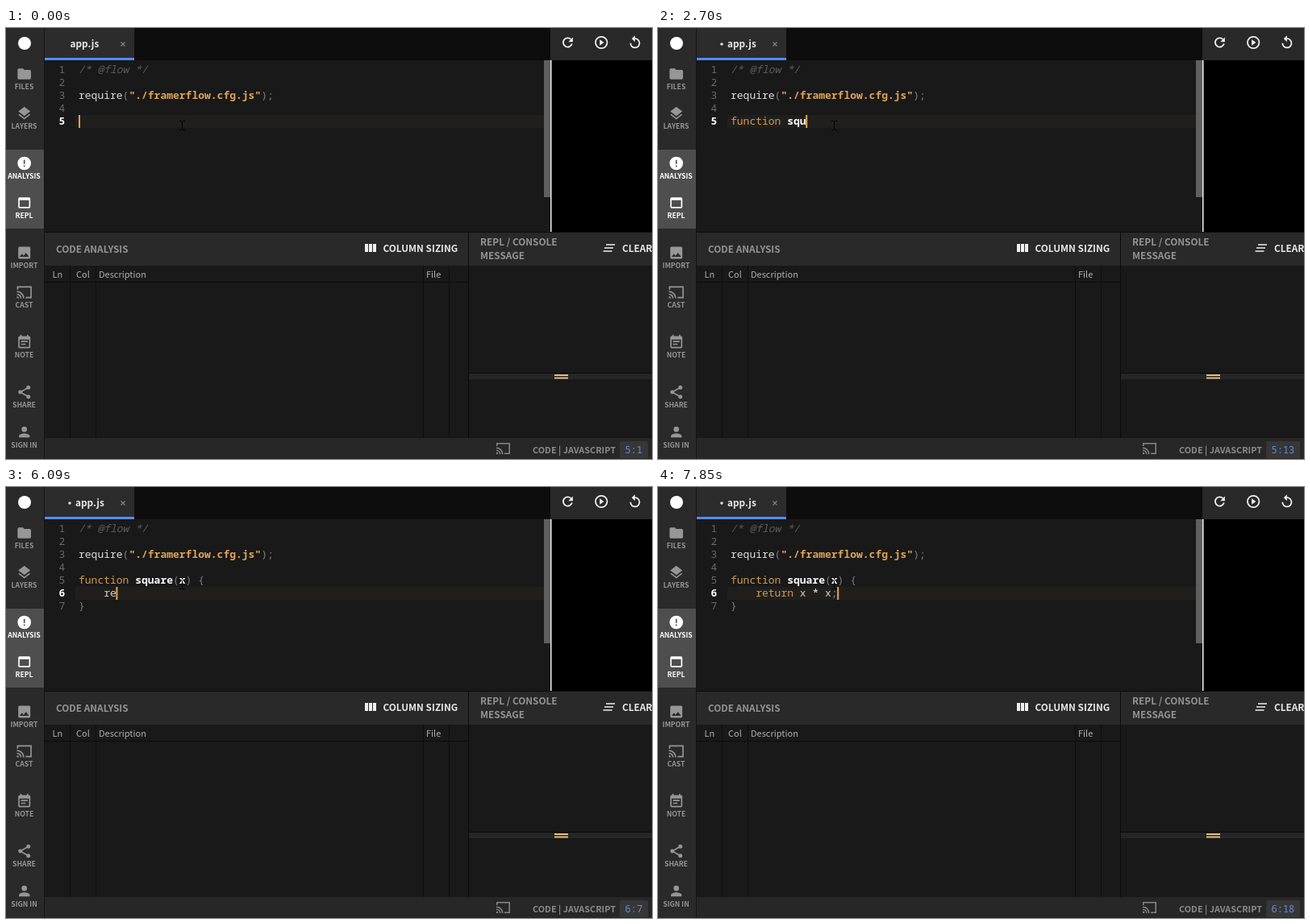
Recreate the animation shown at these times as an HTML page. Size 801x535 px, loop 8000 ms.

```html
<!DOCTYPE html>
<html lang="en">
<head>
<meta charset="utf-8">
<title>Code editor</title>
<style>
html, body { margin: 0; width: 100%; height: 100%; overflow: hidden; background: #191919; }
#stage { position: relative; width: 801px; height: 535px; overflow: hidden; }
svg { position: absolute; left: 0; top: 0; }
text { white-space: pre; }
.ui { font: 700 11.8px "Noto Sans CJK JP", "Noto Sans CJK SC", "Noto Sans CJK", "Noto Sans", sans-serif; fill: #e8e8e8; }
.ui .dim { fill: #949494; }
.ui .small { font-size: 11px; font-weight: 400; fill: #b0b0b0; }
.ui .lang { font-size: 10.9px; fill: #8b8b8b; }
.ui .side { font-size: 8.7px; text-anchor: middle; }
.mono { font: 400 13px "Noto Sans Mono", "DejaVu Sans Mono", monospace; fill: #cfcfcf; }
.num { fill: #686868; }
.num.on { fill: #fff; font-weight: 700; }
.note { fill: #5c5c5c; font-style: italic; }
.call { fill: #dedede; font-weight: 500; }
.str { fill: #dfa356; font-weight: 700; }
.kw { fill: #d59a4d; }
.def { fill: #fff; font-weight: 700; }
.op { fill: #f0f0f0; }
.punct { fill: #7d7d7d; }
#pos { font-size: 12px; fill: #6090dc; }
#menu { position: absolute; width: 464px; background: #242424; color: #eee;
  font: 500 12px/28px "Noto Sans Mono", "DejaVu Sans Mono", monospace;
  box-shadow: 0 12px 40px rgba(0, 0, 0, .6); }
#menu div { height: 28px; padding: 0 7.5px 0 6.5px; white-space: pre; }
#menu div:first-child { background: #2962ff; }
#menu b { font-weight: 500; color: #d8b878; }
#menu i { float: right; font-style: normal; color: #8badf0; }
#menu div:first-child i { color: #fff; }
</style>
</head>
<body>
<div id="stage">
<svg width="801" height="535" viewBox="0 0 801 535">
  <defs>
    <g id="folder"><path d="M-2-8H-8Q-10-8-10-6V6Q-10 8-8 8H8Q10 8 10 6V-4Q10-6 8-6H0z"/></g>
    <g id="layers"><path d="M0-10L9-3 0 4-9-3zM-9 2L-7.4.8 0 6.5 7.4.8 9 2 0 9z"/></g>
    <g id="alert"><circle r="10"/><path d="M-1-5H1V1H-1zM-1 3H1V5H-1z" fill="#4d4d4d"/></g>
    <g id="window"><path fill-rule="evenodd" d="M-7-8H7Q9-8 9-6V6Q9 8 7 8H-7Q-9 8-9 6V-6Q-9-8-7-8zM-7-4V6H7V-4z"/></g>
    <g id="image"><path fill-rule="evenodd" d="M-7-9H7Q9-9 9-7V7Q9 9 7 9H-7Q-9 9-9 7V-7Q-9-9-7-9zM-3.5 1.5L-7 6H7L2.5 0-1 4.5z"/></g>
    <g id="cast"><path fill="none" stroke="currentColor" stroke-width="2" d="M-10-4V-8H10V8H2M-11-1A10 10 0 0 1-1 9M-11 3A6 6 0 0 1-5 9"/><path d="M-11 6A3 3 0 0 1-8 9H-11z"/></g>
    <g id="note"><path fill-rule="evenodd" d="M-7-9H-6V-11H-4V-9H4V-11H6V-9H7Q9-9 9-7V7Q9 9 7 9H-7Q-9 9-9 7V-7Q-9-9-7-9zM-7-4V7H7V-4zM-5-2H5V0H-5zM-5 2H2V4H-5z"/></g>
    <g id="share"><path fill="none" stroke="currentColor" stroke-width="2" d="M6-7L-6 0 6 7"/><circle cx="6" cy="-7" r="3"/><circle cx="-6" r="3"/><circle cx="6" cy="7" r="3"/></g>
    <g id="person"><circle cy="-4" r="4"/><path d="M-8 8V6C-8 3.3-2.7 2 0 2S8 3.3 8 6V8z"/></g>
    <g id="refresh"><path fill="none" stroke="currentColor" stroke-width="2.2" d="M5-5A7 7 0 1 0 6.7 2"/><path d="M8-8V-1H1z"/></g>
    <g id="play"><circle r="9" fill="none" stroke="currentColor" stroke-width="2.2"/><path d="M-2.5-4.8L4 0-2.5 4.8z"/></g>
    <g id="replay"><path fill="none" stroke="currentColor" stroke-width="2.2" d="M0-6A7 7 0 1 1-7 1"/><path d="M0-11V-1L-5-6z"/></g>
  </defs>

  <rect width="801" height="535" fill="#191919"/>
  <g id="panels"></g>
  <circle cx="23" cy="19" r="8" fill="#fff"/>
  <g id="icons"></g>
  <g class="ui" id="labels">
    <text id="tab" y="24">app.js</text>
    <text x="62" y="278.5" class="dim">CODE ANALYSIS</text>
    <text x="467.5" y="277.5">COLUMN SIZING</text>
    <text x="588" y="270" class="dim">REPL / CONSOLE</text>
    <text x="588" y="287" class="dim">MESSAGE</text>
    <text x="764" y="277.5">CLEAR</text>
    <text x="57.5" y="310" class="small">Ln</text>
    <text x="87" y="310" class="small">Col</text>
    <text x="115" y="310" class="small">Description</text>
    <text x="521" y="310" class="small">File</text>
  </g>
  <circle id="dirty" cx="79" cy="20" r="1.8" fill="#ddd"/>
  <path d="M142.5 17.5l5 5m0-5l-5 5" stroke="#858585" stroke-width="1.1"/>
  <path d="M445 268h4v10h-4zm5 0h4v10h-4zm5 0h4v10h-4z" fill="#eee"/>
  <path d="M744 269h11m-13 4h11m-12.500 4h11" stroke="#eee" stroke-width="1.7"/>
  <path d="M680 431h17m-17 3.500h17" stroke="#e6bd78" stroke-width="2"/>

  <rect id="row" x="86" width="581" height="16" fill="#211f1d"/>
  <rect id="mark" y="108" height="16" fill="#454341"/>
  <g class="mono" id="code"></g>
  <path id="match" stroke="#b0b0b0" fill="none"/>
  <rect id="caret" width="2" height="16" fill="#e6a550"/>
  <rect id="thumb" x="667" y="40" width="8" fill="#5f5f5f"/>
  <path d="M215 115.500h2.500l1 1 1-1h2.500M218.500 116v9.500M215 126.500h2.500l1-1 1 1h2.500" fill="none" stroke="#000"/>

  <g id="status">
    <use href="#cast" transform="translate(616.5 522) scale(.77)" fill="#868686" color="#868686"/>
    <text x="653" y="528" class="ui"><tspan class="lang">CODE | JAVASCRIPT</tspan></text>
  </g>
  <rect id="posBox" y="513" height="21" rx="2" fill="#373737"/>
  <text id="pos" class="mono" y="528"></text>
</svg>
<div id="menu"></div>
</div>

<script>
const $ = id => document.getElementById(id);
const LOOP = 8000, CW = 7.8, LEFT = 90, TOP = 44, ROW = 16;
const set = (id, attrs) => {
  for (const k in attrs) $(id).setAttribute(k, attrs[k]);
};
const show = (id, on) => { $(id).style.display = on ? '' : 'none'; };

// x, y, width, height, colour
const panels = [
  [0, 0, 47, 535, '#2a2a2a'], [0, 151, 47, 98, '#4e4e4e'], [47, 0, 1, 535, '#141414'],
  [48, 0, 627, 40, '#0d0d0d'], [48, 0, 111, 37, '#2c2c2c'], [48, 37, 111, 3, '#4f8ef5'],
  [675, 0, 126, 40, '#292929'], [676, 40, 125, 213, '#000'], [675, 40, 1.5, 213, '#f0f0f0'],
  [48, 253, 753, 1, '#0d0d0d'], [48, 254, 753, 41, '#292929'],
  [48, 315, 525, 1, '#0b0b0b'], [573, 254, 1, 255, '#0b0b0b'],
  ...[79, 111, 517, 549].map(x => [x, 295, 1, 214, '#0e0e0e']),
  [574, 428, 227, 8, '#262626'], [574, 428, 227, 1, '#0b0b0b'],
  [48, 509, 753, 26, '#272727']
];
$('panels').innerHTML = panels.map(([x, y, w, h, c]) =>
  `<rect x="${x}" y="${y}" width="${w}" height="${h}" fill="${c}"/>`).join('');

const icon = (id, x, y, scale, color) =>
  `<use href="#${id}" transform="translate(${x} ${y}) scale(${scale})" fill="${color}" color="${color}"/>`;
const side = [
  ['folder', 'FILES', 57], ['layers', 'LAYERS', 106], ['alert', 'ANALYSIS', 168],
  ['window', 'REPL', 217], ['image', 'IMPORT', 279], ['cast', 'CAST', 328],
  ['note', 'NOTE', 390], ['share', 'SHARE', 452], ['person', 'SIGN IN', 501.5]
];
const sideColor = y => y > 151 && y < 249 ? '#fff' : '#969696';
$('icons').innerHTML =
  side.map(([id, , y]) => icon(id, 22.7, y, .833, sideColor(y))).join('') +
  ['refresh', 'play', 'replay'].map((id, i) => icon(id, 696.5 + i * 41.7, 18, .8, '#f2f2f2')).join('');
$('labels').innerHTML += side.map(([, name, y]) =>
  `<text class="side" x="22.5" y="${y + 19}" style="fill:${sideColor(y)}">${name}</text>`).join('');

// Timeline: each entry patches the state before it
const events = [[0, { head: '', body: null, caret: 1, mark: null, match: null, menu: null, dirty: 0, lag: 0 }]];
const at = (t, patch) => events.push([t, patch]);
const type = (key, base, chars, times) =>
  times.forEach((t, i) => at(t, { [key]: base + chars.slice(0, i + 1), caret: 1 }));
const every = (t, gap, n) => Array.from({ length: n }, (_, i) => t + i * gap);

at(310, { caret: 0 });
at(740, { caret: 1 });
type('head', '', 'function', every(1070, 107, 8));
at(1940, { head: 'function ', mark: [0, 8] });
at(2040, { dirty: 1 });
at(2160, { mark: null });
type('head', 'function ', 'square', [2270, 2490, 2700, 2830, 2930, 3030]);
at(3140, { head: 'function square(', tail: ')' });
at(3240, { match: [15, 16] });
at(3570, { caret: 0 });
at(3790, { head: 'function square(x', caret: 1, match: [15, 17] });
at(3900, { menu: { col: 17, line: 5, items: 1 } });
at(4120, { mark: [16, 1] });
at(4330, { caret: 0 });
at(4870, { caret: 1 });
at(4990, { head: 'function square(x)', tail: '', menu: null, mark: null });
at(5100, { head: 'function square(x) ', match: null });
at(5310, { head: 'function square(x) {', tail: '}' });
at(5420, { match: [19, 20] });
at(5640, { tail: '', body: '    ', match: null });
type('body', '    ', 'return x', every(5970, 110, 8));
at(6860, { menu: { col: 12, line: 6, items: 3 } });
at(6970, { body: '    return x ' });
at(7080, { body: '    return x *', lag: 1 });
at(7190, { menu: null, lag: 0 });
type('body', '    return x *', ' x', [7300, 7410]);
at(7520, { menu: { col: 16, line: 6, items: 3 } });
at(7740, { body: '    return x * x;', lag: 1 });
at(7850, { menu: null, lag: 0 });

let last = { tail: '' };
const states = events.map(([t, patch]) => (last = { ...last, ...patch, t }));

const span = (col, cls, s) => `<tspan x="${LEFT + col * CW}" class="${cls}">${s}</tspan>`;
const tokens = (line, isHead) => [...line.matchAll(/\w+|\S/g)].map(m => {
  const s = m[0];
  const cls = /^(function|return)$/.test(s) ? 'kw'
    : /[(){};]/.test(s) ? 'punct'
    : s === '*' ? 'op'
    : isHead && m.index ? 'def' : '';
  return span(m.index, cls, s);
}).join('');

const suggestions = (n, line) => {
  const mixed = 'mi<b>x</b>ed<i>[type: mixed]</i>';
  const list = n === 1 ? [mixed] : ['<b>x</b>', 'e<b>x</b>ports<i>{}</i>', mixed];
  return list.map(s => `<div>${s}</div>`).join('');
};

function draw(s) {
  const multi = s.body !== null;
  const active = multi ? 6 : 5;
  const col = (multi ? s.body : s.head).length;
  const lines = [
    span(0, 'note', '/* @flow */'), '',
    span(0, 'call', 'require') + span(7, 'punct', '(') +
      span(8, 'str', '"./framerflow.cfg.js"') + span(29, 'punct', ');'),
    '', tokens(s.head + s.tail, true)
  ];
  if (multi) lines.push(tokens(s.body), tokens('}'));
  $('code').innerHTML = lines.map((line, i) =>
    `<text y="${TOP + i * ROW + 12}"><tspan x="65.5" class="num${i + 1 === active ? ' on' : ''}">${i + 1}</tspan>${line}</text>`).join('');

  const y = TOP + (active - 1) * ROW;
  set('row', { y });
  set('caret', { x: LEFT + col * CW - (col ? .4 : 0), y });
  show('caret', s.caret);
  set('thumb', { height: multi ? 154 : 170 });
  show('mark', s.mark);
  if (s.mark) set('mark', { x: LEFT + s.mark[0] * CW, width: s.mark[1] * CW });
  set('match', { d: (s.match || []).map(c => `M${LEFT + c * CW} 123.5h${CW}`).join('') });

  show('dirty', s.dirty);
  set('tab', { x: s.dirty ? 86 : 79.5 });

  const pos = `${active}:${col + 1 - s.lag}`;
  const shift = (pos.length - 3) * 7;
  $('pos').textContent = pos;
  set('pos', { x: 767.5 - shift });
  set('posBox', { x: 761 - shift, width: 35 + shift });
  set('status', { transform: `translate(${-shift} 0)` });

  show('menu', s.menu);
  if (s.menu) {
    const { col: c, line, items } = s.menu;
    $('menu').style.left = Math.round(LEFT + c * CW) + 'px';
    $('menu').style.top = TOP + line * ROW + 'px';
    $('menu').innerHTML = suggestions(items);
  }
}

let shown;
function tick() {
  const t = performance.now() % LOOP;
  const state = states.findLast(s => s.t <= t);
  if (state !== shown) draw(shown = state);
  requestAnimationFrame(tick);
}
tick();
</script>
</body>
</html>
```
